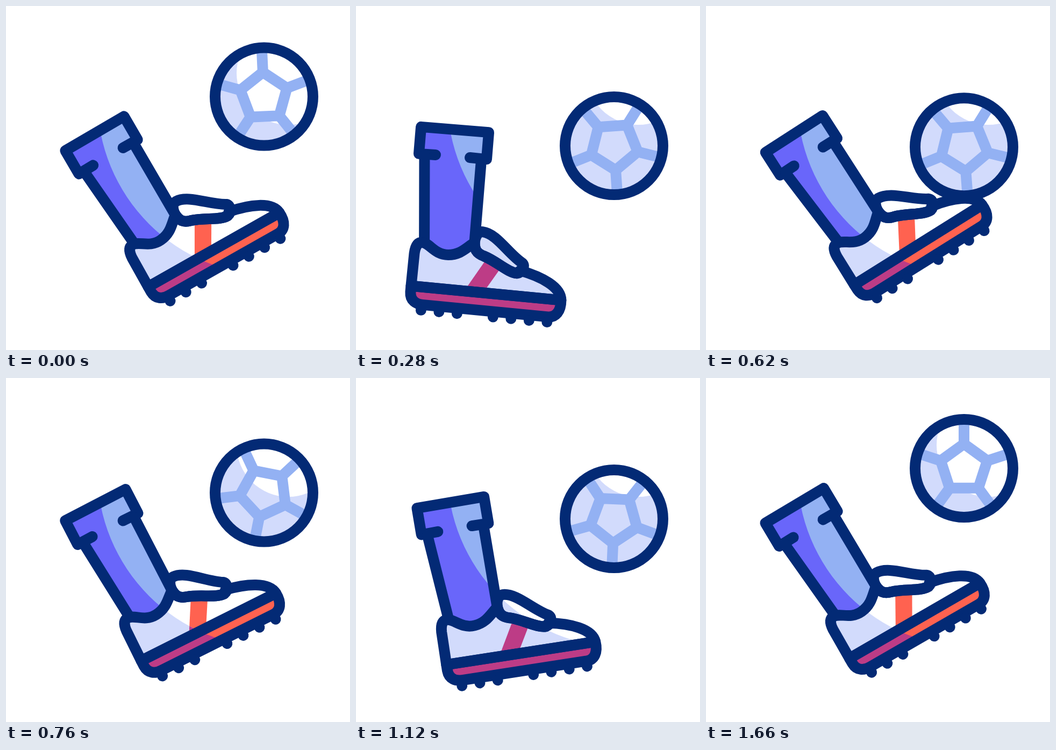
Recreate the animation shown at these times as an HTML page with a canvas. Size 640 by 640 pixels, loop 2400 ms.

```html
<!DOCTYPE html>
<html>
<head>
<meta charset="utf-8">
<style>
html, body { margin: 0; height: 100%; overflow: hidden; background: #fff; }
canvas { display: block; width: 640px; height: 640px; }
</style>
</head>
<body>
<canvas id="stage" width="640" height="640"></canvas>
<script>
const c = document.getElementById('stage').getContext('2d');
const NAVY = '#032a75', BLUE = '#93b1f3';
const LIGHT = { sock: BLUE, shoe: '#fff', accent: '#ff6250' };
const SHADE = { sock: '#6966fa', shoe: '#d2dbfc', accent: '#bd3c86' };
const LOOP = 2400, STEP = 20, END = 1680;
const PIVOT = [186, 264], DRAWN_ANGLE = 5.35;

// Leg parts, drawn at DRAWN_ANGLE
const collar = 'C138 441 146 463 172 463 C195 463 205 450 221 440';
const sock = new Path2D('M121 225 L247 235 L243 285 L233 287 L221 440 C205 450 195 463 172 463 C146 463 138 441 127.5 440 V276 L117 275Z');
const cuff = new Path2D('M148 277 L117 275 L121 225 L247 235 L243 285 L212 282');
const shaft = new Path2D('M127.5 278 V440 M233 288 L221 438');
const upper = new Path2D('M103 521 L109 460 C111 446 116 440 123 440 ' + collar +
  ' C221 452 224 460 238 465 C263 475 283 496 300 497 L306 492 C345 503 382 522 382 547Z');
const tongue = new Path2D('M221 441 C222 428 228 419 236 420 C262 423 284 461 310 478 C316 484 310 496 300 497 C283 496 263 475 238 465 C224 460 221 452 221 441Z');
const stripe = new Path2D('M204 527 L245 468 L272 484 L241 528Z');
const sole = new Path2D('M103 521 L102 532 C101 548 112 555 125 556 L358 578 C372 579 382 568 382 547Z');
const studs = new Path2D();
for (let i = 0; i < 8; i++) {
  if (i === 3) continue;
  const x = 121.5 + 33.5 * i, y = 566 + 3.1 * i;
  studs.moveTo(x + 10, y);
  studs.arc(x, y, 10, 0, 7);
}

// Ball pattern around its centre
const pattern = new Path2D(), corners = [];
for (let i = 0; i < 5; i++) {
  const a = (i * 72 - 90) * Math.PI / 180;
  corners.push([45.5 * Math.cos(a), 45.5 * Math.sin(a)]);
}
corners.forEach(([x, y], i) => pattern[i ? 'lineTo' : 'moveTo'](x, y));
pattern.closePath();
for (const [x, y] of corners) {
  pattern.moveTo(x, y);
  pattern.lineTo(x * 1.9, y * 1.9);
}

// Easings
const linear = s => s;
const smooth = s => s * s * (3 - 2 * s);
const fall = s => s * s * (2 - s);
const rise = s => 1 - fall(1 - s);

// Each key: [time, value, easing from the previous key]
const legKeys = [[0, -30], [277, 5.8, smooth], [712, -35, smooth], [945, 5.8, smooth], [1435, -36, smooth], [1640, -30, smooth]];
const dropKeys = [[0, 168], [455, 326, fall], [976, 180, rise], [1232, 327, fall], [END, 168, rise]];
const spinKeys = [[0, 0], [455, -60.5, linear], [976, -3.5, linear], [1232, -50.5, linear], [END, 0, linear]];

function valueAt(keys, t) {
  for (let i = 1; i < keys.length; i++) {
    const [t0, v0] = keys[i - 1], [t1, v1, ease] = keys[i];
    if (t <= t1) return v0 + (v1 - v0) * ease((t - t0) / (t1 - t0));
  }
  return keys[keys.length - 1][1];
}

// Shade stays fixed on the stage: everything outside a circle
function clipOutside(x, y, r) {
  const area = new Path2D();
  area.rect(0, 0, 640, 640);
  area.moveTo(x + r, y);
  area.arc(x, y, r, 0, 7);
  c.clip(area, 'evenodd');
}

function fill(path, color) {
  c.fillStyle = color;
  c.fill(path);
}

function turn([x, y], degrees) {
  c.translate(x, y);
  c.rotate(degrees * Math.PI / 180);
  c.translate(-x, -y);
}

function fillLeg(colors, angle) {
  turn(PIVOT, angle);
  fill(sock, colors.sock);
  fill(sole, colors.accent);
  fill(upper, colors.shoe);
  fill(stripe, colors.accent);
  fill(tongue, colors.shoe);
}

function drawLeg(degrees) {
  const angle = degrees - DRAWN_ANGLE;
  c.save();
  fillLeg(LIGHT, angle);
  c.restore();
  c.save();
  clipOutside(498, 173.5, 328);
  fillLeg(SHADE, angle);
  c.restore();
  c.save();
  turn(PIVOT, angle);
  c.strokeStyle = NAVY;
  for (const path of [cuff, shaft, upper, tongue, sole]) c.stroke(path);
  fill(studs, NAVY);
  c.restore();
}

function drawBall(y, spin) {
  const disc = new Path2D();
  disc.arc(480, y, 91, 0, 7);
  fill(disc, LIGHT.shoe);
  c.save();
  clipOutside(525, 125, 96);
  fill(disc, SHADE.shoe);
  c.restore();
  c.save();
  c.translate(480, y);
  c.rotate(spin * Math.PI / 180);
  c.lineCap = 'butt';
  c.lineJoin = 'miter';
  c.strokeStyle = BLUE;
  c.stroke(pattern);
  c.restore();
  c.strokeStyle = NAVY;
  c.stroke(disc);
}

function draw() {
  const now = Math.floor(performance.now() % LOOP / STEP) * STEP;
  const t = Math.min(now + STEP, END);
  c.fillStyle = '#fff';
  c.fillRect(0, 0, 640, 640);
  c.lineWidth = 20;
  c.lineCap = c.lineJoin = 'round';
  drawLeg(valueAt(legKeys, t));
  drawBall(valueAt(dropKeys, t), valueAt(spinKeys, t));
  requestAnimationFrame(draw);
}
draw();
</script>
</body>
</html>
```
